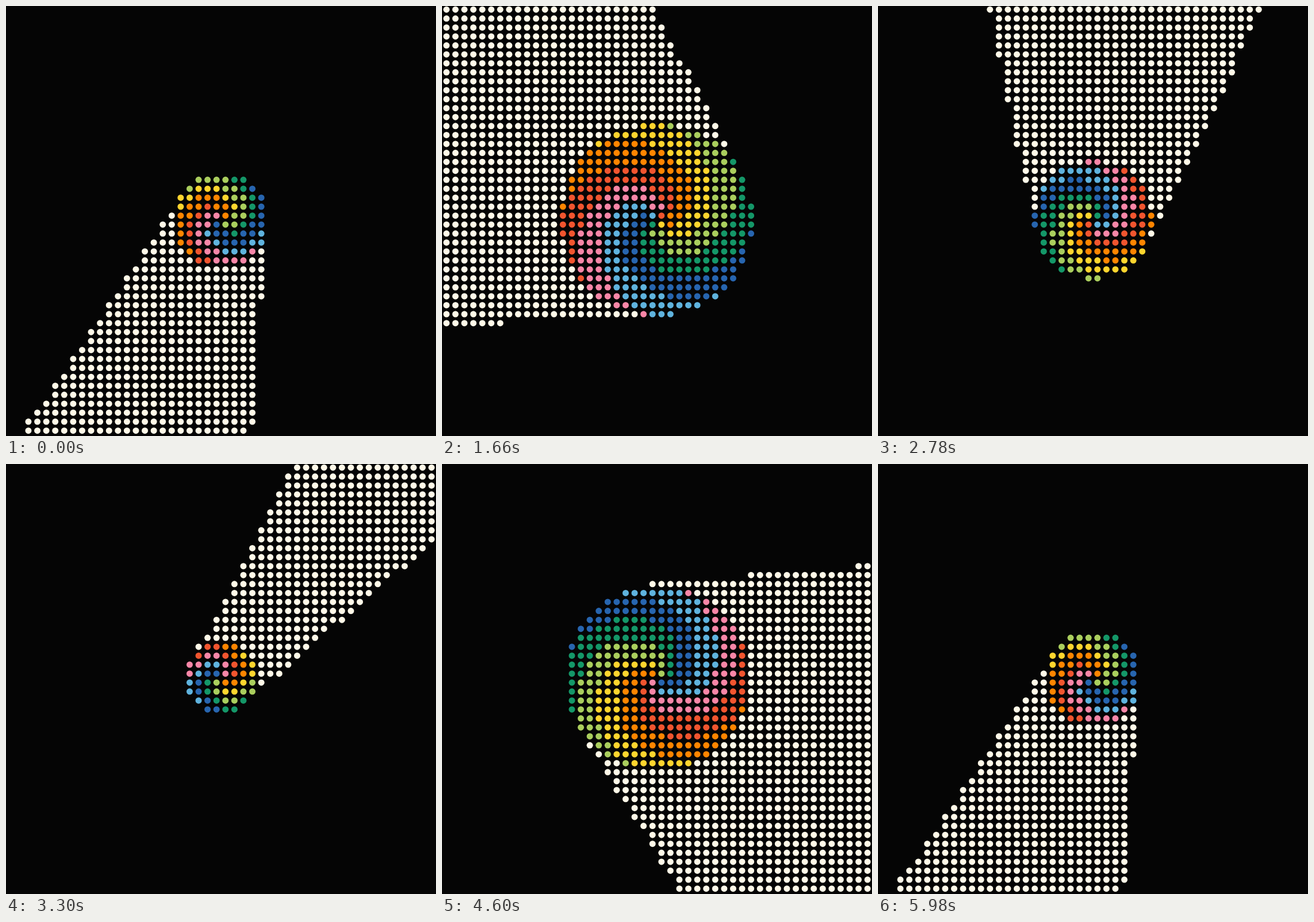
An HTML page with a canvas for the animation above (6 s loop, 748x748 px).

```html
<!DOCTYPE html>
<html lang="en">
<head>
<meta charset="utf-8">
<title>Dot wheel</title>
<style>
  html, body { margin: 0; width: 100%; height: 100%; overflow: hidden; background: #050505; }
  canvas { display: block; width: 100%; height: 100%; }
</style>
</head>
<body>
<canvas width="748" height="748"></canvas>
<script>
const ctx = document.querySelector('canvas').getContext('2d');
const SIZE = 748, N = 48, CELL = SIZE / N, DOT = 5.5;
const STEP = 20, STEPS = 300;
const LIGHT = 20.08;              // distance of the orbiting light, in cells
const BEAM = '#fff9e8';
const COLORS = ['#ff8500', '#ffd52e', '#aace5d', '#149768',
                '#2765af', '#5fb3de', '#f886a7', '#f1552f'];

// Colour of the cell at (x, y), measured from the centre, or null if unlit
function colorAt(x, y, angle, radius) {
  const r = Math.hypot(x, y);
  if (r < radius) {
    const turn = (Math.atan2(y, x) + 3 * angle) * 4 / Math.PI;
    const i = Math.floor(turn + 4 * r / radius - 0.05);
    return COLORS[(i % 8 + 8) % 8];
  }
  // The beam lies between the light's two tangents, behind the disc
  const lx = LIGHT * Math.sin(angle), ly = -LIGHT * Math.cos(angle);
  const vx = x - lx, vy = y - ly, dist = Math.hypot(vx, vy);
  const tangent = Math.sqrt(LIGHT ** 2 - radius ** 2);
  return dist > tangent && -(vx * lx + vy * ly) >= dist * tangent ? BEAM : null;
}

function draw(time) {
  const step = Math.floor(time / STEP) % STEPS;
  const pos = step && step + 1;   // the loop's last pose is held for one extra step
  const angle = (19.2 + 360 * pos / STEPS) * Math.PI / 180;
  const radius = 7.515 - 3.76 * Math.sin(2 * angle);

  ctx.fillStyle = '#050505';
  ctx.fillRect(0, 0, SIZE, SIZE);
  for (let row = 0; row < N; row++) {
    for (let col = 0; col < N; col++) {
      const color = colorAt(col - 23.5, row - 23.5, angle, radius);
      if (!color) continue;
      ctx.fillStyle = color;
      ctx.beginPath();
      ctx.arc((col + 0.5) * CELL, (row + 0.4) * CELL, DOT, 0, 2 * Math.PI);
      ctx.fill();
    }
  }
}

function tick() {
  draw(performance.now());
  requestAnimationFrame(tick);
}
tick();
</script>
</body>
</html>
```
